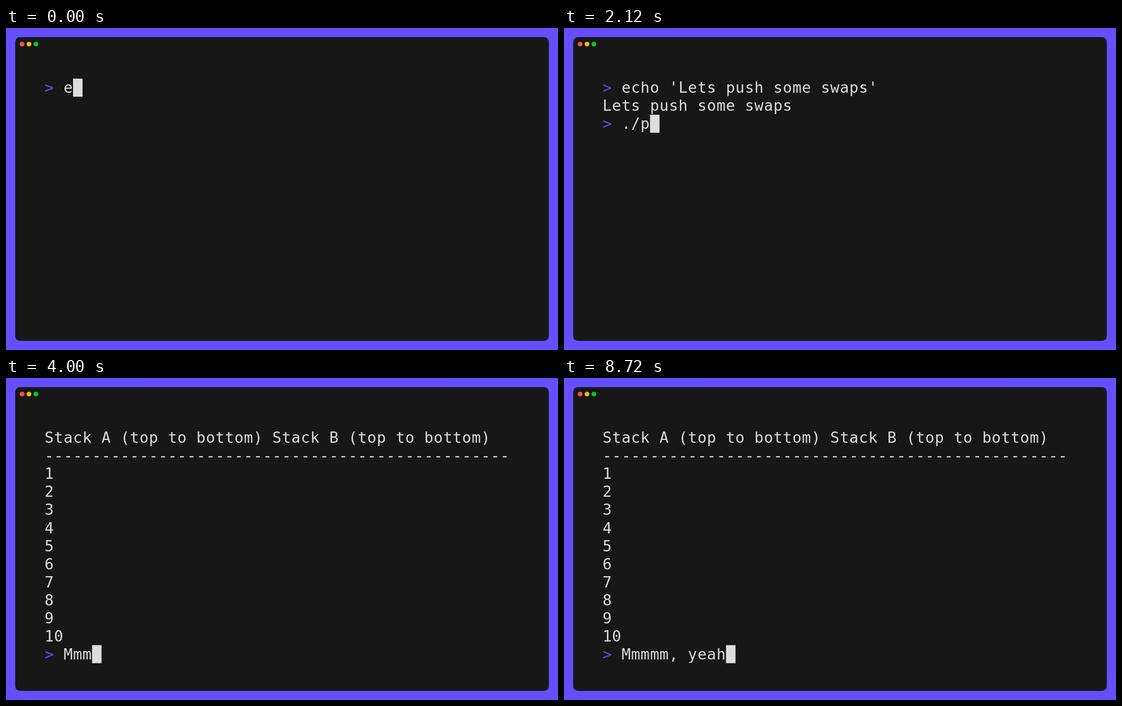
Write an HTML page that moves like this. It is 980x572 px and loops after 8.88 s.

```html
<!DOCTYPE html>
<html lang="en">
<head>
<meta charset="utf-8">
<title>Terminal session</title>
<style>
  html, body { margin: 0; width: 100%; height: 100%; overflow: hidden; background: #674eff; }
  svg { display: block; width: 980px; height: 572px; }
  text {
    font: 33px "DejaVu Sans Mono", monospace;
    letter-spacing: 0.78px;
    white-space: pre;
    fill: #ddd;
  }
  .prompt { fill: #5a56e0; }
</style>
</head>
<body>
<svg viewBox="0 0 1200 700" preserveAspectRatio="none">
  <rect width="1200" height="700" fill="#674eff"/>
  <rect x="20" y="20" width="1160" height="660" rx="10" fill="#171717"/>
  <circle cx="35" cy="35" r="5" fill="#ff4f4d"/>
  <circle cx="50" cy="35" r="5" fill="#febb00"/>
  <circle cx="65" cy="35" r="5" fill="#00cc1d"/>
  <g id="screen"></g>
  <rect id="cursor" fill="#ddd"/>
</svg>
<script>
const LOOP = 8880, TICK = 40;
const X = 83.82, Y = 110.1, CELL = 20.645, LINE = 39.22, BASE = 31;
const NS = "http://www.w3.org/2000/svg";

const ECHO = "> echo 'Lets push some swaps'";
const RUN = "> ./push_swap 7 3 1 9 2 10 6 5 4 8";
const CHEER = "> Mmmmm, yeah";
const TABLE = [
  "Stack A (top to bottom) Stack B (top to bottom)",
  "-".repeat(49),
  ...Array.from({ length: 10 }, (_, i) => String(i + 1))
];

const screen = document.getElementById("screen");
const cursor = document.getElementById("cursor");

function add(parent, tag, attrs, content) {
  const el = document.createElementNS(NS, tag);
  for (const key in attrs) el.setAttribute(key, attrs[key]);
  if (content) el.textContent = content;
  return parent.appendChild(el);
}

const rows = Array.from({ length: 13 }, (_, i) => {
  const text = add(screen, "text", { x: X, y: Y + i * LINE + BASE });
  return { mark: add(text, "tspan", { class: "prompt" }), rest: add(text, "tspan", {}) };
});

// Part of a line typed by time t, one key per gap after the prompt.
function typed(line, t, start, gap) {
  const keys = Math.floor((t - start) / gap) + 1;
  return line.slice(0, 2 + Math.max(0, keys));
}

// A quote appears together with its neighbouring key.
function typedEcho(t) {
  const line = typed(ECHO, t, 10, 52);
  if (t < 80) return ECHO.slice(0, 3);
  return line.length === 8 || line.length === 28 ? line.slice(0, -1) : line;
}

function linesAt(t) {
  if (t < 1880) return [typedEcho(t)];
  const log = [ECHO, "Lets push some swaps"];
  if (t < 3800) return [...log, typed(RUN, t, 1975, 51)];
  if (t < 3840) return [...log, RUN, ""];
  return [...TABLE, typed(CHEER, t, 3877, 51)];
}

function draw(t) {
  const lines = linesAt(t);
  rows.forEach((row, i) => {
    const line = lines[i] || "";
    const cut = line.startsWith(">") ? 1 : 0;
    row.mark.textContent = line.slice(0, cut);
    row.rest.textContent = line.slice(cut);
  });
  const last = lines.length - 1;
  const hidden = t >= 4935 && Math.floor((t - 4935) / 537) % 2 === 0;
  cursor.setAttribute("x", X + lines[last].length * CELL);
  cursor.setAttribute("y", Y + last * LINE);
  cursor.setAttribute("width", CELL);
  cursor.setAttribute("height", LINE);
  cursor.setAttribute("visibility", hidden ? "hidden" : "visible");
}

const begin = performance.now();
let shown = -1;
function frame() {
  const t = Math.floor(((performance.now() - begin) % LOOP) / TICK) * TICK;
  if (t !== shown) draw(shown = t);
  requestAnimationFrame(frame);
}
draw(0);
requestAnimationFrame(frame);
</script>
</body>
</html>
```
